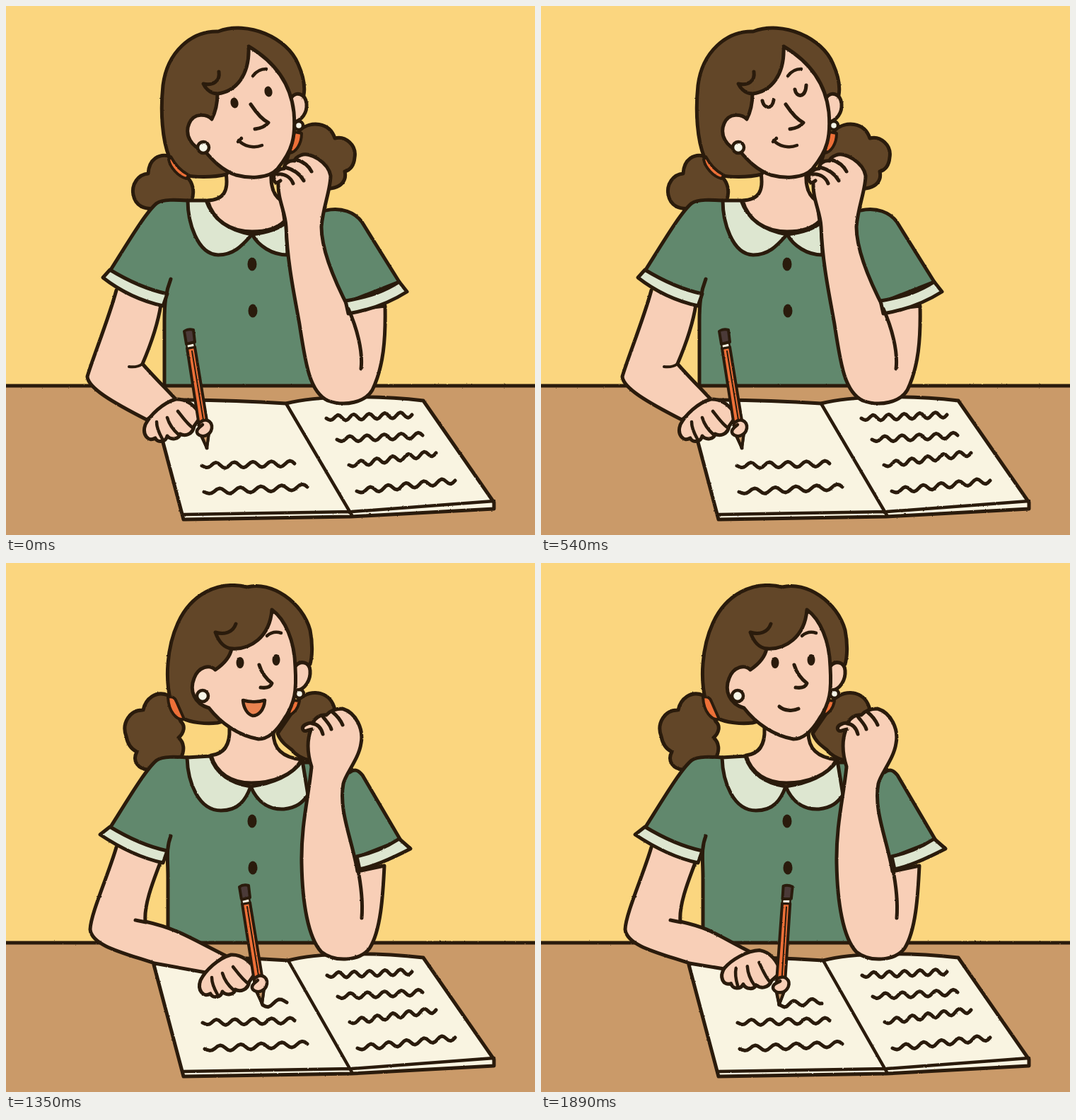
An HTML page that plays this animation: 748x748 px, repeating every 2.16 s.

```html
<!DOCTYPE html>
<html lang="en">
<head>
<meta charset="utf-8">
<title>Thinking and writing</title>
<style>
html, body { margin: 0; width: 100%; height: 100%; overflow: hidden; background: #fbd67f; }
svg { display: block; width: 100vw; height: 100vh; }
#scene { stroke-linecap: round; stroke-linejoin: round; }
</style>
</head>
<body>
<svg viewBox="0 0 748 748">
  <filter id="crayon" filterUnits="userSpaceOnUse" x="-12" y="-12" width="772" height="772" color-interpolation-filters="sRGB">
    <feTurbulence id="grain" type="fractalNoise" baseFrequency=".3" numOctaves="2"/>
    <feDisplacementMap in="SourceGraphic" scale="1.8" xChannelSelector="R" yChannelSelector="G"/>
  </filter>
  <rect width="748" height="748" fill="#fbd67f"/>
  <rect y="537" width="748" height="211" fill="#ca9a69"/>
  <g id="scene" filter="url(#crayon)"></g>
</svg>
<script>
const INK = '#2a1b0c', SKIN = '#f8cfb7', HAIR = '#624628', GREEN = '#61886d',
      TRIM = '#dde6d0', PAPER = '#f9f4e1', ORANGE = '#ee7038', WOOD = '#ca9a69', RUBBER = '#4b3a38';
const STEP = 270;

const shape = (d, fill = 'none', width = 5) =>
  `<path d="${d}" fill="${fill}" stroke="${INK}" stroke-width="${width}"/>`;
const patch = (d, fill) => `<path d="${d}" fill="${fill}"/>`;
const oval = (x, y, rx, ry, tilt = 0) =>
  `<ellipse cx="${x}" cy="${y}" rx="${rx}" ry="${ry}" fill="${INK}" transform="rotate(${tilt} ${x} ${y})"/>`;
const pearl = (x, y, r) =>
  `<circle cx="${x}" cy="${y}" r="${r}" fill="#f7f6e8" stroke="${INK}" stroke-width="4.5"/>`;
const shift = ([x, y], art) => `<g transform="translate(${x} ${y})">${art}</g>`;

function wave(x1, y1, x2, y2, turns, height = 4) {
  const count = Math.ceil(turns * 8);
  let d = '';
  for (let i = 0; i <= count; i++) {
    const t = i / count;
    const swing = height * Math.sin(t * turns * 2 * Math.PI) * Math.min(1, .5 + 4 * t);
    d += `${i ? 'L' : 'M'}${(x1 + (x2 - x1) * t).toFixed(1)},${(y1 + (y2 - y1) * t + swing).toFixed(1)}`;
  }
  return shape(d);
}

// Head, pigtails, collar and propped arm for the two attitudes.
const poses = {
  dream: {
    tailL: 'M234,213C216,207 202,217 201,237C187,238 177,252 180,267C183,283 196,288 211,286L262,276C267,265 265,250 256,242Z',
    tailR: 'M416,175C430,163 457,163 465,187C480,183 496,197 493,214C492,226 486,232 479,234C482,247 474,256 459,258L430,262L392,234L400,208Z',
    neck: 'M311,236C315,262 308,274 285,275C293,304 318,319 348,319C372,319 385,313 394,304L390,276C378,268 374,255 375,238',
    collarL: 'M257,275C257,305 270,351 300,352C324,352 336,336 348,323C318,318 293,304 283,275Z',
    collarR: 'M348,323C357,339 376,352 398,352L396,306C384,317 365,321 348,323Z',
    shoulder: 'L452,289C475,284 493,292 503,305L556,390L480,420',
    cap: 'M231,214C221,190 218,150 222,112C228,65 262,35 300,36C342,20 398,45 413,82C421,100 423,115 421,126L405,150L330,200L312,238C292,243 265,242 252,239C240,232 234,222 231,214Z',
    earR: 'M404,129C410,121 423,123 425,138C426,152 418,161 408,164',
    bandL: 'M233,213C240,226 250,235 259,239L255,244C243,241 232,228 230,217Z',
    bandR: 'M408,178L418,180C418,195 410,207 401,208Z',
    face: 'M343,57C375,76 402,105 407,150C410,185 405,205 384,230C370,246 340,243 325,239C305,232 292,218 281,205C262,200 252,182 259,166C266,150 284,153 291,160C297,148 299,136 299,124C325,121 345,98 343,57Z',
    curl: 'M301,93C303,106 293,113 279,110C284,120 291,124 300,124',
    brow: 'M349,99C354,92 361,89 368,89',
    nose: 'M346,139C352,148 361,160 371,165C367,170 360,173 352,174',
    eyes: oval(323, 137, 5.5, 7.5, -12) + oval(371, 121, 5.5, 7.5, -12),
    closed: shape('M313,134C315,145 327,147 329,133') + shape('M359,118C361,130 374,130 375,112'),
    smile: shape('M333,187L328,192M329,190C336,198 350,202 362,197', 'none', 4.5),
    pearls: pearl(279, 200, 8) + pearl(414, 169, 6),
    prop: 'M385,249C384,275 395,290 396,312C398,365 408,410 415,450C424,510 430,546 455,558C480,567 508,560 518,543C534,510 537,470 536,424L486,430C465,390 446,345 446,312C448,285 459,260 459,240C456,222 430,205 417,211C411,213 408,217 408,219C400,218 393,223 393,230C386,230 376,238 379,246C381,252 384,250 388,247',
    fingers: 'M410,217C420,220 428,226 432,234M394,228C407,231 416,238 421,247M384,238C394,236 403,243 406,251',
    crease: 'M484,428C496,455 505,488 502,513',
    cuffX: 480, cuffY: 417
  },
  write: {
    tailL: 'M232,185C215,178 200,190 197,206C178,205 166,225 173,243C175,255 182,262 188,265C181,278 190,290 205,290L250,274C256,263 255,252 247,245C255,238 257,228 250,222Z',
    tailR: 'M414,193C432,176 460,182 465,208L450,240L428,279C418,276 410,272 404,264C396,258 388,252 384,241L404,212Z',
    neck: 'M316,234C317,258 308,270 290,272C297,298 320,311 347,311C376,311 406,301 418,278C390,275 378,262 378,240',
    collarL: 'M257,275C258,310 273,350 305,350C330,350 340,335 347,316C320,312 297,298 290,273Z',
    collarR: 'M347,316C358,342 377,349 394,348C412,346 420,339 428,328L420,279C406,301 376,312 347,316Z',
    shoulder: 'L420,282L440,282L486,296C494,290 499,294 504,300L558,392L497,416',
    cap: 'M234,195C226,165 228,120 244,85C262,45 300,24 342,34C376,25 420,55 431,95C435,115 434,133 431,143L410,160L340,215L300,226C285,228 262,226 250,219C242,212 238,206 234,195Z',
    earR: 'M411,145C417,138 430,139 431,152C432,166 424,178 412,181',
    bandL: 'M230,190C235,188 240,190 242,196L253,221C242,223 231,210 230,190Z',
    bandR: 'M406,194L416,195C414,206 408,213 400,216Z',
    face: 'M377,66C396,80 409,110 410,147C412,180 410,198 394,221C383,239 370,249 358,249C330,244 305,227 288,205C267,199 260,180 267,163C273,146 290,143 297,151C310,142 318,132 320,121C346,123 374,105 377,66Z',
    curl: 'M326,86C322,98 310,102 297,98C302,112 310,120 320,121',
    brow: 'M370,103C377,97 384,97 390,99',
    nose: 'M359,144C362,155 370,165 377,170C375,176 368,177 361,176',
    eyes: oval(332, 141, 5.5, 8) + oval(383, 137, 5.5, 8),
    smile: shape('M338,203C345,209 357,210 365,206'),
    talk: shape('M336,194C345,197 358,197 367,194C366,209 357,216 350,216C342,214 337,205 336,194Z', '#ea8350', 4.5),
    pearls: pearl(279, 188, 8) + pearl(416, 185, 6),
    prop: 'M431,236C425,252 427,272 432,288C428,330 417,370 418,425C419,480 427,530 446,550C465,565 500,563 514,545C530,520 533,470 535,428L497,436C489,390 470,350 477,312C480,298 499,277 502,255C506,235 495,212 476,206C466,206 458,209 453,215C444,214 437,219 434,226C426,226 417,230 420,236C423,240 428,235 433,235',
    fingers: 'M462,211C468,216 473,222 476,229M448,217C452,223 458,228 460,235M433,227C442,228 446,234 448,242',
    crease: 'M497,430C502,455 505,478 503,502',
    cuffX: 496, cuffY: 415
  }
};

// Small differences between alternating drawings.
const looks = [
  { tail: [0, 0], neck: [0, 0], head: [0, 0], tips: [137, 567], side: 224, spine: 396, text: 0 },
  { tail: [2, -3], neck: [1, -1], head: [0, 1], tips: [137, 569], side: 224, spine: 399, text: 1 },
  { tail: [0, 0], neck: [0, 0], head: [0, 0], tips: [139, 569], side: 222, spine: 400, text: 4 },
  { tail: [-3, 2], neck: [-1, 0], head: [-1, 0], tips: [133, 572], side: 229, spine: 399, text: 1 }
];

// grip: thumb x, thumb y, turn of hand and pencil
const rest = [282, 597, 0];
const timeline = [
  { pose: 'dream', look: 0, eyes: 'eyes', mouth: 'smile', grip: rest },
  { pose: 'dream', look: 1, eyes: 'eyes', mouth: 'smile', grip: rest },
  { pose: 'dream', look: 0, eyes: 'closed', mouth: 'smile', grip: rest },
  { pose: 'dream', look: 1, eyes: 'eyes', mouth: 'smile', grip: rest },
  { pose: 'write', look: 2, eyes: 'eyes', mouth: 'talk', grip: [389, 595, -15], wrist: [335, 561, 312, 588] },
  { pose: 'write', look: 3, eyes: 'eyes', mouth: 'talk', grip: [360, 595, 0], wrist: [310, 555, 282, 579], ink: [363, 1.1] },
  { pose: 'write', look: 2, eyes: 'eyes', mouth: 'smile', grip: [350, 596, 7], wrist: [304, 553, 273, 577], ink: [350, 1.7] },
  { pose: 'write', look: 3, eyes: 'eyes', mouth: 'smile', grip: [341, 597, 13], wrist: [298, 551, 265, 575], ink: [338, 2.3] }
];

function torso(p, look) {
  return patch(`M213,279C222,273 240,274 257,275L300,320L400,320${p.shoulder}L440,430L438,537L${look.side},537L${look.side},408C200,402 175,391 148,373C175,330 200,290 213,279Z`, GREEN)
    + shape('M257,275C240,274 222,273 213,279C198,291 172,335 148,373')
    + shape('M' + p.shoulder.slice(1))
    + shape(`M233,386C226,404 ${look.side},420 ${look.side},445V537`)
    + shape(p.neck, SKIN)
    + shift(look.neck, shape(p.collarL, TRIM) + shape(p.collarR, TRIM))
    + oval(348, 365, 6.5, 9.5) + oval(349, 431, 6.5, 9.5);
}

function book({ spine, text }, ink) {
  const line = (x1, y1, x2, y2, turns) => wave(x1 + text, y1, x2, y2, turns);
  return shape(`M209,568L251,726L488,722L690,711V702L590,558C520,550 440,551 ${spine},562C350,559 300,557 240,557Z`, PAPER)
    + shape(`M250,719L489,715L690,700M${spine},562L489,720`, 'none', 4.5)
    + line(277, 650, 408, 647, 5) + line(280, 687, 426, 680, 5)
    + line(453, 583, 574, 578, 5.5) + line(468, 613, 589, 607, 5)
    + line(485, 649, 608, 632, 5.5) + line(496, 686, 635, 671, 5.5)
    + (ink ? wave(ink[0], 625, 397, 619, ink[1]) : '');
}

function head(p, frame) {
  return shape(p.cap, HAIR) + shape(p.bandL, ORANGE, 4) + shape(p.bandR, ORANGE, 4)
    + shape(p.earR, SKIN) + shape(p.face, SKIN)
    + shape(p.curl, HAIR) + shape(p.brow, 'none', 4.5) + shape(p.nose)
    + p.pearls + p[frame.eyes] + p[frame.mouth];
}

function pencilHand([x, y, turn]) {
  const pencil = shape('M256,484L267,482L287,604L284,625L275,606Z', ORANGE, 4)
    + patch('M275,604L287,602L284,625Z', WOOD)
    + shape('M275,604L284,625L287,602', 'none', 4)
    + shape('M283,621L284,625')
    + shape('M263,488L279,585', 'none', 2)
    + shape('M255,478L266,476L267,482L256,484Z', PAPER, 2.5)
    + shape('M252,460C256,457 261,457 265,458L267,475L255,478Z', RUBBER, 4);
  const hand = shape('M240,556C222,561 204,578 197,592C192,606 201,617 211,611C214,618 226,617 228,608C233,614 245,613 246,605C253,609 264,606 266,594L276,580C268,565 255,555 240,556Z', SKIN)
    + shape('M213,588C213,596 217,605 221,612M228,582C231,592 237,600 244,606M243,573C250,582 257,592 265,597', 'none', 4.5);
  const thumb = shape('M273,590C282,581 292,587 291,597C289,608 277,611 271,605C267,599 275,595 278,592', SKIN, 4.5);
  return `<g transform="translate(${x} ${y}) rotate(${turn}) translate(-282 -597)">${hand}${pencil}${thumb}</g>`;
}

function writingArm({ wrist, grip }, tipX) {
  let arm;
  if (wrist) {
    const [ux, uy, lx, ly] = wrist;
    arm = shape(`M156,402C145,440 120,495 119,518C121,541 165,551 210,566L${lx},${ly}L${ux},${uy}C${ux - 50},${uy - 25} 242,517 197,507C195,485 206,455 218,424`, SKIN)
      + shape('M183,505L198,508');
  } else {
    arm = shape('M156,402C146,440 120,505 115,524C116,540 150,560 199,585L240,556C225,540 207,522 193,506C202,485 214,455 219,422', SKIN)
      + shape('M174,510C182,511 189,509 193,506', 'none', 4);
  }
  return arm + shape(`M147,373L${tipX},384C160,402 190,417 222,424L228,407C200,401 175,390 147,373Z`, TRIM)
    + pencilHand(grip);
}

function proppedArm(p, tipX) {
  const { cuffX: x, cuffY: y } = p;
  return shape(p.prop, SKIN)
    + shape(`M556,390L${tipX},404C545,418 520,429 ${x + 4},${y + 18}L${x},${y}C515,411 536,403 556,390Z`, TRIM)
    + shape(p.crease) + shape(p.fingers);
}

function draw(frame) {
  const p = poses[frame.pose], look = looks[frame.look];
  return shift(look.tail, shape(p.tailL, HAIR)) + shape(p.tailR, HAIR)
    + torso(p, look) + shape('M-8,537H756')
    + book(look, frame.ink)
    + shift(look.head, head(p, frame))
    + writingArm(frame, look.tips[0])
    + proppedArm(p, look.tips[1]);
}

const scene = document.getElementById('scene'), grain = document.getElementById('grain');
const start = performance.now();
let shown = -1;

function update() {
  const step = Math.floor(Math.max(0, performance.now() - start) / STEP) % timeline.length;
  if (step !== shown) {
    shown = step;
    grain.setAttribute('seed', timeline[step].look + 1);
    scene.innerHTML = draw(timeline[step]);
  }
  requestAnimationFrame(update);
}
update();
</script>
</body>
</html>
```
